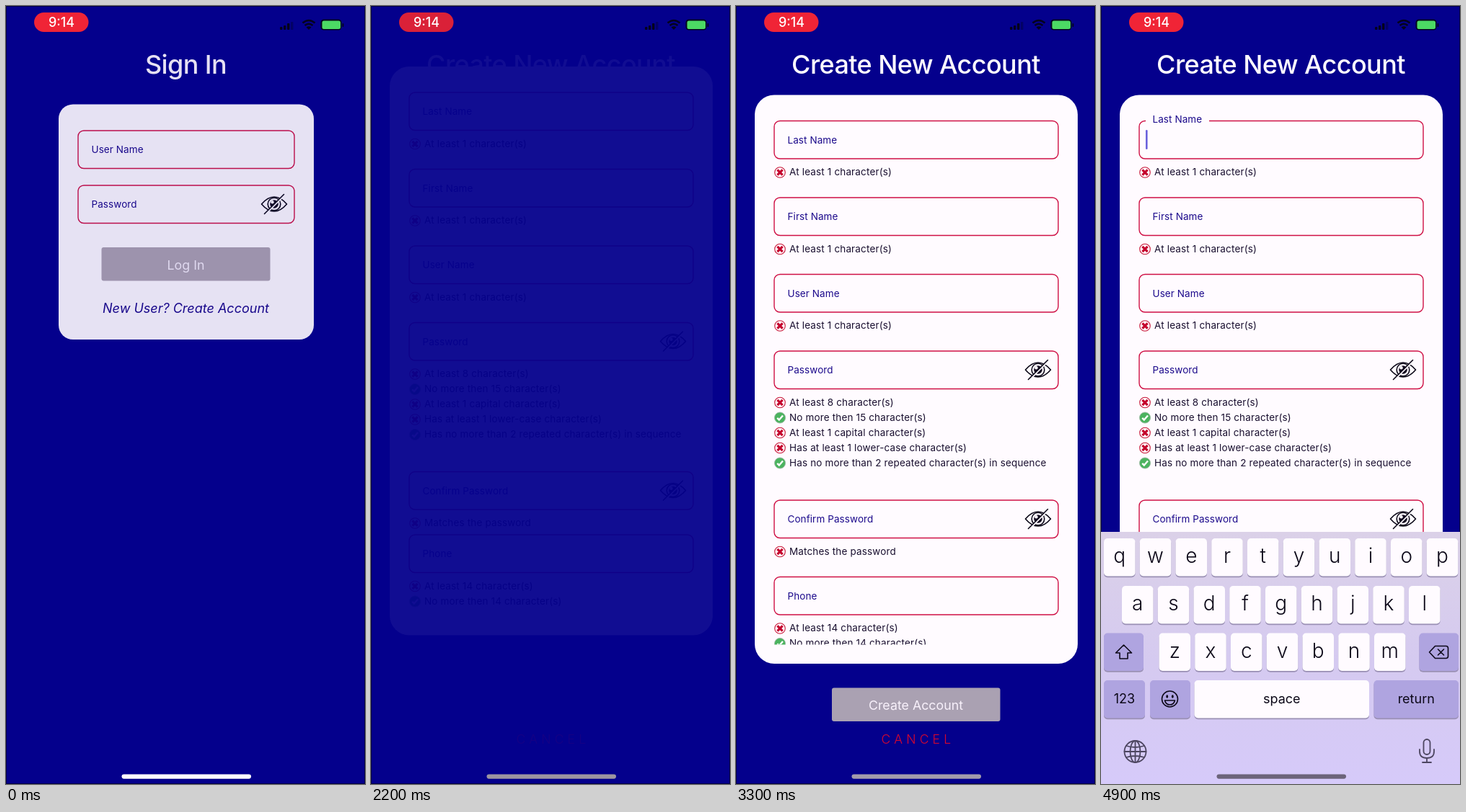
An HTML page that plays this animation: 498 px wide and 1080 px high, repeating every 5000 ms.

```html
<!DOCTYPE html>
<html lang="en">
<head>
<meta charset="utf-8">
<title>Sign in and create account</title>
<style>
  html, body { margin: 0; width: 100%; height: 100%; overflow: hidden; background: #04008c; }
  svg { display: block; width: 498px; height: 1080px; font-family: Inter, Roboto, sans-serif; }
  text { white-space: pre; }
  .title { font-size: 36px; font-weight: 500; letter-spacing: -.6px; fill: #fffaff; text-anchor: middle; }
  .label { font-size: 13.5px; letter-spacing: .08px; fill: #1c0a8c; }
  .note { font-size: 13.5px; letter-spacing: .15px; fill: #1a1030; }
  .button { font-size: 17.8px; fill: #f8f1fb; text-anchor: middle; }
  .link { font-size: 18px; font-style: italic; fill: #1c0a8c; text-anchor: middle; }
  .cancel { font-size: 17.5px; font-weight: 300; letter-spacing: 5.2px; fill: #d8062e; }
  .clock { font-size: 18px; font-weight: 500; fill: #fff; text-anchor: middle; }
  .letter { font-size: 28px; font-weight: 300; fill: #0c0818; text-anchor: middle; }
  .word { font-size: 18px; fill: #0c0818; text-anchor: middle; }
  .card { fill: #fffbff; }
  .field { fill: none; stroke: #cf1045; stroke-width: 1.4; }
  .line { fill: none; stroke: #0c0818; stroke-width: 1.6; stroke-linecap: round; stroke-linejoin: round; }
  .tool { stroke: #4d4660; stroke-width: 1.8; }
</style>
</head>
<body>
<svg id="stage" viewBox="0 0 498 1080"></svg>
<script>
const LOOP = 5000, STEP = 100;
const KEYBOARD_TOP = 730, KEYBOARD_HEIGHT = 350, TAP = 3430;

const rect = (x, y, w, h, r, attrs = '') =>
  `<rect x="${x}" y="${y}" width="${w}" height="${h}" rx="${r}" ${attrs}/>`;
const text = (x, y, kind, value, attrs = '') =>
  `<text x="${x}" y="${y}" class="${kind}" ${attrs}>${value}</text>`;
const path = (d, attrs = 'class="line"') => `<path d="${d}" ${attrs}/>`;
const at = (x, y, body, attrs = '') => `<g transform="translate(${x} ${y})" ${attrs}>${body}</g>`;

// Icons, centred on their origin
const eye = (x, y) => at(x, y, `
  <path d="M-17.5 0Q-9 -10 0 -10T17.5 0Q9 10 0 10T-17.5 0Z" class="line"/>
  <circle r="8.8" class="line"/>
  <circle r="5.8" fill="#140c20"/>
  <circle cx="-2.5" cy="-2.8" r="2.2" class="card"/>
  <path d="M-11.5 13.5L15.5 -13.5" stroke="#fffbff" stroke-width="2"/>
  <path d="M-13.5 13.5L13.5 -13.5" class="line" stroke-width="2"/>`);
const badge = (x, y, ok) => at(x, y, ok
  ? `<circle r="7.6" fill="#4bb35f" stroke="#a4b8aa" stroke-width=".8"/>
     <path d="M-3.8 .4L-1.2 3L4 -3" fill="none" stroke="#fff" stroke-width="2.4"/>`
  : `<circle r="7.3" fill="#fff6fa" stroke="#c8183a" stroke-width="1.1"/>
     <path d="M-3.6 -3.6L3.6 3.6M3.6 -3.6L-3.6 3.6" stroke="#c4042c" stroke-width="3.2"/>`);

// A form field; notes starting with "+" are satisfied rules
function field(y, label, notes, { secret, id } = {}) {
  const floating = id
    ? rect(62, y - 2, 88, 4, 0, 'class="card" id="gap"') +
      rect(62, y + 12.5, 2.6, 27, 1.3, 'fill="#6a62dc" id="caret"')
    : '';
  return rect(53, y, 394, 52.5, 8, 'class="field"') + floating +
    text(71.5, y + 31, 'label', label, id ? `id="${id}"` : '') +
    (secret ? eye(419, y + 26) : '') +
    notes.map((note, i) => {
      const ok = note[0] === '+', cy = y + 71.5 + 21 * i;
      return badge(61, cy, ok) + text(74, cy + 4, 'note', note.slice(ok ? 1 : 0));
    }).join('');
}

const statusBar = () =>
  rect(39, 9, 75.5, 27, 13.5, 'id="pill"') + text(77, 29, 'clock', '9:14') +
  [4, 6, 9, 11].map((h, i) =>
    rect(380 + 5 * i, 33 - h, 3.4, h, 1, `fill="#04031c" opacity="${i < 3 ? 1 : .35}"`)).join('') +
  path('M411.5 23.5Q420 16.5 428.5 23.5M414.5 27Q420 22.5 425.5 27',
    'fill="none" stroke="#04031c" stroke-width="2.6"') +
  path('M416.5 29.5Q420 27 423.5 29.5L420 33Z', 'fill="#04031c"') +
  rect(436.5, 18.5, 29, 15, 4.5, 'fill="#04031c"') +
  rect(438.5, 20.5, 25.5, 11.5, 2.5, 'fill="#4cd964"') +
  rect(466.5, 24, 1.8, 5, 1, 'fill="#04031c"');

const signIn = () =>
  text(249.5, 94, 'title', 'Sign In') +
  rect(73, 136.5, 354, 326.5, 20, 'class="card"') +
  rect(100, 173, 300, 52.5, 8, 'class="field"') + text(118.5, 204, 'label', 'User Name') +
  rect(100, 249, 300, 52.5, 8, 'class="field"') + text(118.5, 280, 'label', 'Password') +
  eye(372, 275) +
  rect(132.5, 335, 234, 46.5, 3, 'fill="#aea3b1"') + text(249.5, 365.5, 'button', 'Log In') +
  text(249.5, 426, 'link', 'New User? Create Account');

const createForm = () =>
  rect(26, 0, 448, 789.5, 27, 'class="card"') +
  `<g clip-path="url(#viewport)">` +
  field(36, 'Last Name', ['At least 1 character(s)'], { id: 'focusLabel' }) +
  field(142.5, 'First Name', ['At least 1 character(s)']) +
  field(249, 'User Name', ['At least 1 character(s)']) +
  field(355.5, 'Password', ['At least 8 character(s)', '+No more then 15 character(s)',
    'At least 1 capital character(s)', 'Has at least 1 lower-case character(s)',
    '+Has no more than 2 repeated character(s) in sequence'], { secret: true }) +
  field(562.5, 'Confirm Password', ['Matches the password'], { secret: true }) +
  `<g id="phone">${field(0, 'Phone', ['At least 14 character(s)', '+No more then 14 character(s)'])}</g></g>`;

function key(x, y, w, caption, { dark, kind = 'letter', dy = 34 } = {}) {
  return rect(x, y + 1.3, w, 53, 5, 'fill="#9a90b4"') +
    rect(x, y, w, 52.5, 5, `fill="${dark ? '#afa4e0' : '#fffbff'}"`) +
    text(x + w / 2, y + dy, kind, caption);
}
const keyRow = (letters, x, y) =>
  [...letters].map((c, i) => key(x + 49.75 * i, y, 43.5, c)).join('');

const keyboard = () => {
  const word = { kind: 'word', dy: 31.5 }, darkWord = { ...word, dark: true };
  return rect(0, 0, 498, KEYBOARD_HEIGHT + 10, 0, 'fill="url(#keys)"') +
    keyRow('qwertyuiop', 4, 9) + keyRow('asdfghjkl', 29, 75) + keyRow('zxcvbnm', 80.5, 140.5) +
    key(4, 140.5, 55, '', darkWord) + key(441.5, 140.5, 54.5, '', darkWord) +
    key(4, 206, 57, '123', darkWord) + key(68, 206, 56, '', darkWord) +
    key(129.5, 206, 242.5, 'space', word) + key(378.5, 206, 117.5, 'return', darkWord) +
    at(31.5, 167, path('M0 -10L11 1H5.5V9H-5.5V1H-11Z')) +
    at(468.5, 167, path('M-13 0L-5 -8.5H10Q13 -8.5 13 -5.5V5.5Q13 8.5 10 8.5H-5ZM-1 -4L7 4M7 -4L-1 4')) +
    at(95.5, 232, `<circle r="11" class="line"/>
      <ellipse cx="-3.8" cy="-3.5" rx="1.4" ry="2.2" fill="#0c0818"/>
      <ellipse cx="3.8" cy="-3.5" rx="1.4" ry="2.2" fill="#0c0818"/>` +
      path('M-7 2H7Q5.5 8 0 8T-7 2Z')) +
    at(47.5, 305, `<circle r="15" class="line tool"/><ellipse rx="7" ry="15" class="line tool"/>` +
      path('M-15 0H15M0 -15V15M-12.5 -8Q0 -4 12.5 -8M-12.5 8Q0 4 12.5 8', 'class="line tool"')) +
    at(452, 304, rect(-4.5, -16, 9, 21, 4.5, 'class="line tool"') +
      path('M-10 -2V1Q-10 10 0 10T10 1V-2M0 10V16M-6 16H6', 'class="line tool"'));
};

const $ = id => document.getElementById(id);
$('stage').innerHTML = `
  <defs>
    <clipPath id="viewport"><rect x="26" width="448" height="763"/></clipPath>
    <linearGradient id="keys" x2="0" y2="1">
      <stop stop-color="#dbd1e8"/><stop offset=".5" stop-color="#d5caf0"/><stop offset="1" stop-color="#d6cafa"/>
    </linearGradient>
  </defs>
  <rect width="498" height="1080" fill="#04008c"/>
  <g id="signIn">${signIn()}</g>
  <g id="create">
    <g id="form">${createForm()}</g>
    ${text(249.5, 94, 'title', 'Create New Account')}
  </g>
  <g id="submit">${rect(133, 0, 233.5, 46.5, 3, 'fill="#aaa1b2"') + text(249.5, 30, 'button', 'Create Account')}</g>
  ${text(201.5, 1024, 'cancel', 'CANCEL', 'id="cancel"')}
  ${statusBar()}
  <rect x=".5" y=".5" width="497" height="1079" fill="none" stroke="#000" opacity=".5"/>
  <g id="keyboard">${keyboard()}</g>
  ${rect(160.5, 1066.5, 179.5, 6.2, 3.1, 'id="home"')}`;

const clamp = x => Math.min(1, Math.max(0, x));
const mix = (a, b, k) => a + (b - a) * k;
const progress = (t, from, to) => clamp((t - from) / (to - from));
const smooth = x => x * x * (3 - 2 * x);
const easeOut = x => 1 - (1 - x) ** 3;
const mixColor = (a, b, k) => `rgb(${a.map((v, i) => Math.round(mix(v, b[i], k)))})`;
const move = (id, y) => $(id).setAttribute('transform', `translate(0 ${y})`);
const fade = (id, opacity) => $(id).setAttribute('opacity', opacity);
const paint = (id, color) => $(id).setAttribute('fill', color);

// Critically damped spring from 0 to 1
const spring = (ms, rate = .016) => ms <= 0 ? 0 : 1 - (1 + rate * ms) * Math.exp(-rate * ms);

const HOME_COLORS = [
  [1200, [255, 252, 255]], [1500, [141, 133, 143]], [2400, [160, 154, 166]],
  [3800, [163, 155, 176]], [4600, [108, 100, 122]]
];
function homeColor(t) {
  let [time, color] = HOME_COLORS[0];
  for (const [nextTime, nextColor] of HOME_COLORS) {
    if (t < nextTime) return mixColor(color, nextColor, progress(t, time, nextTime));
    [time, color] = [nextTime, nextColor];
  }
  return mixColor(color, color, 0);
}

function draw(t) {
  const pulse = .5 + .5 * Math.cos(2 * Math.PI * t / 1633);
  paint('pill', mixColor([212, 32, 56], [240, 36, 54], pulse));
  paint('home', homeColor(t));

  fade('signIn', t < 1800 ? mix(.9, 1, progress(t, 0, 250)) : 1 - smooth(progress(t, 1800, 2150)));

  const shown = smooth(progress(t, 2126, 2676));
  fade('create', shown);
  fade('cancel', clamp(shown * 1.5));
  fade('submit', smooth(progress(t, 2310, 2620)));
  move('submit', mix(535, 946.5, easeOut(progress(t, 2400, 2600))));

  const settle = easeOut(progress(t, 2400, 2730));
  move('form', mix(84, 123.5, settle));
  move('phone', mix(650, 669, settle));

  const focus = smooth(progress(t, TAP, TAP + 220));
  move('focusLabel', -29 * focus);
  fade('gap', focus);
  const blink = (t - TAP - 70) % 1000;
  fade('caret', t > TAP + 70 && (blink < 600 || blink > 950) ? 1 : 0);

  move('keyboard', mix(1080, KEYBOARD_TOP, spring(t - TAP)));
}

const start = performance.now();
function tick() {
  const elapsed = (performance.now() - start) % LOOP;
  draw(Math.floor(elapsed / STEP) * STEP);
  requestAnimationFrame(tick);
}
tick();
</script>
</body>
</html>
```
